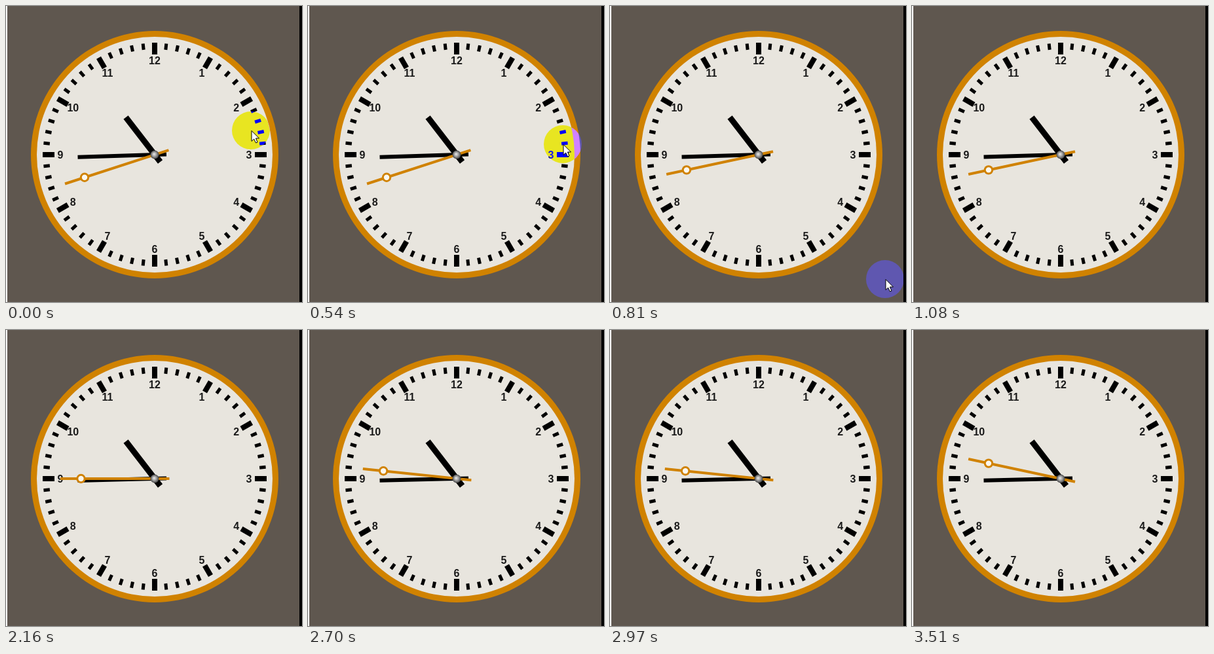
Animation, 452 px wide and 452 px high, one loop 3.78 s. Source, as an HTML page with a canvas:

```html
<!DOCTYPE html>
<html lang="en">
<head>
<meta charset="utf-8">
<title>Station clock</title>
<style>
html, body { margin: 0; width: 100%; height: 100%; overflow: hidden; background: #fff; }
canvas { display: block; width: 452px; height: 452px; }
</style>
</head>
<body>
<canvas id="stage" width="452" height="452"></canvas>
<script>
const ctx = document.getElementById('stage').getContext('2d');
const LOOP = 3780, C = 227;
const INK = '#000', ORANGE = '#d08200', FACE = '#e8e5de', WALL = '#5f574f';
const ticks = [810, 1350, 2160, 2700, 3510];
const pointer = [
  { until: 540, x: 374, y: 190 },
  { until: 810, x: 389, y: 211 },
  { until: 1080, x: 420, y: 417 }
];

function disc(x, y, r, fill) {
  ctx.beginPath();
  ctx.arc(x, y, r, 0, Math.PI * 2);
  ctx.fillStyle = fill;
  ctx.fill();
}

// Radial bar; deg runs clockwise from 12
function bar(deg, from, to, width, color) {
  ctx.save();
  ctx.translate(C, C);
  ctx.rotate(deg * Math.PI / 180);
  ctx.fillStyle = color;
  ctx.fillRect(-width / 2, -to, width, to - from);
  ctx.restore();
}

function polar(deg, r) {
  const a = deg * Math.PI / 180;
  return [C + r * Math.sin(a), C - r * Math.cos(a)];
}

function dial() {
  disc(C, C, 189, ORANGE);
  disc(C, C, 180, FACE);
  for (let i = 0; i < 60; i++) {
    if (i % 5) bar(i * 6, 161, 170.5, 5, INK);
    else bar(i * 6, 153, 171, 8, INK);
  }
  ctx.font = 'bold 16px "Liberation Sans", Arial, sans-serif';
  ctx.textAlign = 'center';
  ctx.textBaseline = 'alphabetic';
  ctx.fillStyle = '#1a1a1a';
  for (let h = 1; h <= 12; h++) {
    const [x, y] = polar(h * 30, 144);
    ctx.fillText(h, x, y + 5.5);
  }
}

function hands(sec) {
  const min = 44 + sec / 60;
  bar((10 + min / 60) * 30, -14, 72, 9, INK);
  bar(min * 6, -18, 117.5, 6, INK);

  bar(sec * 6, -22.5, 144, 4, ORANGE);
  const [x, y] = polar(sec * 6, 112.5);
  disc(x, y, 7.2, ORANGE);
  disc(x, y, 4.2, '#fbf8f0');

  const cap = ctx.createRadialGradient(C - 1, C - 1, 0, C, C, 6.5);
  cap.addColorStop(0, '#eee');
  cap.addColorStop(0.45, '#aaa');
  cap.addColorStop(1, '#444');
  disc(C, C, 6.5, cap);
}

function arrow(x, y) {
  const pts = [[0, 0], [0, 16], [3.7, 12.6], [6.5, 18.5], [9, 17.5], [6.5, 11.5], [11.5, 11.5]];
  ctx.beginPath();
  for (const [px, py] of pts) ctx.lineTo(x + px + 0.5, y + py + 0.5);
  ctx.closePath();
  ctx.fillStyle = '#fff';
  ctx.fill();
  ctx.lineWidth = 1;
  ctx.strokeStyle = '#000';
  ctx.stroke();
}

function draw(t) {
  ctx.fillStyle = '#fff';
  ctx.fillRect(0, 0, 452, 452);
  ctx.fillStyle = WALL;
  ctx.fillRect(2, 0, 446, 452);

  dial();
  hands(42 + ticks.filter(at => t >= at).length);

  const p = pointer.find(s => t < s.until);
  if (p) {
    // The highlight inverts only the blue channel
    ctx.globalCompositeOperation = 'difference';
    disc(p.x, p.y, 29, '#00f');
    ctx.globalCompositeOperation = 'source-over';
    arrow(p.x + 0.5, p.y);
  }

  ctx.fillStyle = '#000';
  ctx.fillRect(448, 0, 4, 452);
}

const start = performance.now();
function frame() {
  draw((performance.now() - start) % LOOP);
  requestAnimationFrame(frame);
}
frame();
</script>
</body>
</html>
```
